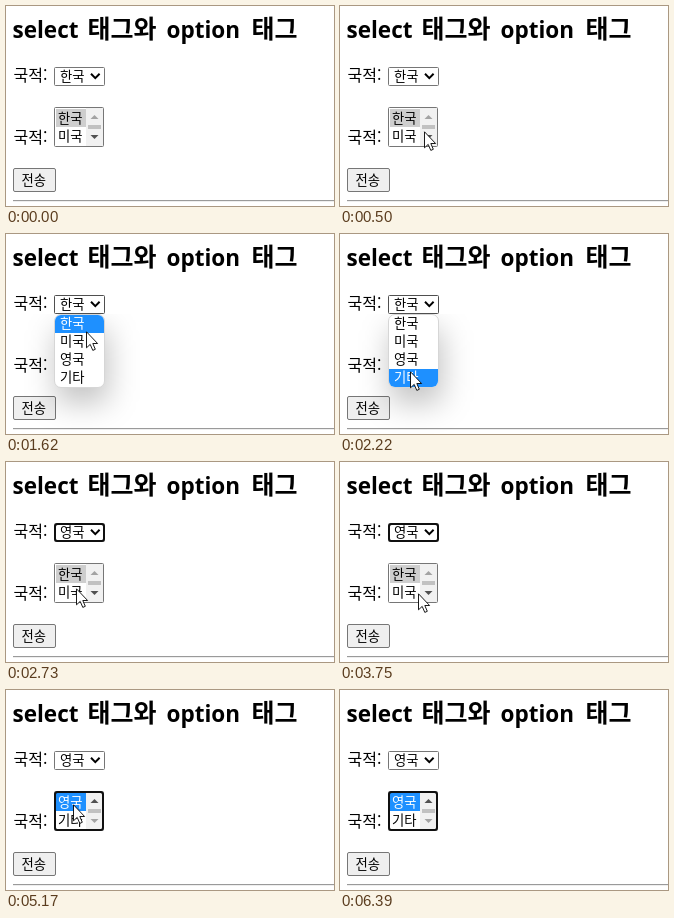
Write an HTML page that moves like this. It is 328 px wide and 200 px high and loops after 7 s.

```html
<!DOCTYPE html>
<html lang="ko">
<head>
<meta charset="utf-8">
<title>select 태그와 option 태그</title>
<style>
html, body { margin: 0; width: 100%; height: 100%; overflow: hidden; background: #fff; }
svg { display: block; width: 328px; height: 200px; }
text { font: 350 13.33px "Noto Sans CJK KR", "Noto Sans CJK", "Noto Sans CJK JP", sans-serif; fill: #000; white-space: pre; }
.h { font-size: 25px; font-weight: 700; }
.hl { font: 700 22.5px "Open Sans", "Noto Sans", sans-serif; }
.label { font-size: 16px; }
.box { fill: #fff; stroke: #767676; }
.ring { fill: none; stroke: #101010; stroke-width: 2; }

/* one loop is 7 s, so 1% is 70 ms */
.a { animation: 7s step-end infinite; }

.hover { animation-name: hover; }
@keyframes hover { 0%, 39% { stroke: #767676 } 11.42% { stroke: #4f4f4f } }

.first { animation-name: first; }
@keyframes first { 0% { visibility: visible } 39%, 100% { visibility: hidden } }
.second { animation-name: second; }
@keyframes second { 0% { visibility: hidden } 39%, 100% { visibility: visible } }
.selectRing { animation-name: selectRing; }
@keyframes selectRing { 0%, 57.85%, 100% { visibility: hidden } 39% { visibility: visible } }
.listRing { animation-name: listRing; }
@keyframes listRing { 0% { visibility: hidden } 57.85%, 100% { visibility: visible } }

.popup { animation-name: popup; }
@keyframes popup { 0%, 39%, 100% { visibility: hidden } 17.28% { visibility: visible } }
.bar { animation-name: bar; }
@keyframes bar {
  0% { transform: translateY(0) }
  24.57% { transform: translateY(18px) }
  26% { transform: translateY(36px) }
  28.85% { transform: translateY(54px) }
  33.14%, 100% { transform: translateY(36px) }
}
.o1 { animation-name: o1; }
@keyframes o1 { 0% { fill: #fff } 24.57%, 100% { fill: #000 } }
.o2 { animation-name: o2; }
@keyframes o2 { 0%, 26%, 100% { fill: #000 } 24.57% { fill: #fff } }
.o3 { animation-name: o3; }
@keyframes o3 { 0%, 28.85% { fill: #000 } 26%, 33.14%, 100% { fill: #fff } }
.o4 { animation-name: o4; }
@keyframes o4 { 0%, 33.14%, 100% { fill: #000 } 28.85% { fill: #fff } }

.rows { animation-name: rows; }
@keyframes rows {
  0% { transform: translateY(0) }
  57.85% { transform: translateY(-18px) }
  59.28%, 100% { transform: translateY(-36px) }
}
.pick { animation-name: pick; }
@keyframes pick { 0% { visibility: hidden } 73.85%, 100% { visibility: visible } }
.picked { animation-name: picked; }
@keyframes picked { 0% { fill: #000 } 73.85%, 100% { fill: #fff } }
.up { animation-name: up; }
@keyframes up { 0% { fill: #a3a3a3 } 57.85%, 100% { fill: #505050 } }
.down { animation-name: down; }
@keyframes down { 0% { fill: #505050 } 59.28%, 100% { fill: #a3a3a3 } }
.downBox { animation-name: downBox; }
@keyframes downBox { 0%, 59.28%, 100% { fill: #f1f1f1 } 55% { fill: #d2d2d2 } }

/* the pointer moves in 100 ms steps */
.pointer { animation-name: pointer; }
@keyframes pointer {
  0% { transform: translate(76px, 190px); visibility: hidden }
  2.85% { transform: translate(76px, 190px); visibility: visible; animation-timing-function: steps(3) }
  7.14% { transform: translate(84px, 125px); animation-timing-function: steps(3) }
  11.42% { transform: translate(91px, 78px) }
  12.85% { transform: translate(90px, 73px) }
  14.28% { transform: translate(90px, 72px) }
  21.71% { transform: translate(85px, 84px) }
  23.14% { transform: translate(80px, 97px); animation-timing-function: steps(4) }
  28.85% { transform: translate(72px, 142px); animation-timing-function: steps(2) }
  31.71% { transform: translate(70px, 137px) }
  33.14% { transform: translate(70px, 132px) }
  34.57% { transform: translate(70px, 128px) }
  36% { transform: translate(70px, 126px) }
  43.42% { transform: translate(75px, 122px); animation-timing-function: steps(2) }
  46.28% { transform: translate(86px, 114px) }
  49.14% { transform: translate(74px, 121px) }
  50.57% { transform: translate(60px, 129px) }
  53.57% { transform: translate(78px, 131px) }
  55% { transform: translate(94px, 133px) }
  65.14% { transform: translate(76.5px, 130px); animation-timing-function: steps(4) }
  70.85% { transform: translate(67px, 114px) }
  82.71% { transform: translate(62px, 124px) }
  84.14% { transform: translate(50px, 136px) }
  85.57% { transform: translate(43px, 150px); animation-timing-function: steps(3) }
  89.85% { transform: translate(145px, 190px); visibility: visible }
  91.28%, 100% { transform: translate(145px, 190px); visibility: hidden }
}
</style>
</head>
<body>
<svg viewBox="0 0 328 200">
  <defs>
    <clipPath id="view"><rect x="49" y="102" width="31" height="38"/></clipPath>
    <clipPath id="below"><rect y="80" width="328" height="120"/></clipPath>
    <clipPath id="menu"><rect x="49" y="81" width="49" height="72" rx="6"/></clipPath>
  </defs>

  <text class="hl" x="6.5" y="32">select</text>
  <text class="h" x="81.5" y="32">태그와</text>
  <text class="hl" x="160.5" y="32">option</text>
  <text class="h" x="245.5" y="32">태그</text>

  <text class="label" x="7.5" y="75">국적:</text>
  <rect class="box a hover" x="48.5" y="61.5" width="50" height="18" rx="1"/>
  <rect class="ring a selectRing" x="49" y="62" width="49" height="17" rx="2.5"/>
  <text class="a first" x="54" y="75">한국</text>
  <text class="a second" x="54" y="75">영국</text>
  <path d="M85 67.8l4.3 4.3 4.3-4.3" fill="none" stroke="#000" stroke-width="2"/>

  <text class="label" x="7.5" y="137">국적:</text>
  <rect class="box" x="48.5" y="101.5" width="49" height="39" rx="1"/>
  <g clip-path="url(#view)">
    <g class="a rows">
      <rect x="50" y="103" width="30" height="18" fill="#cecece"/>
      <rect class="a pick" x="50" y="139" width="30" height="18" fill="#1e90ff"/>
      <text x="52" y="117">한국</text>
      <text x="52" y="135">미국</text>
      <text class="a picked" x="52" y="153">영국</text>
      <text x="52" y="171">기타</text>
    </g>
  </g>
  <rect x="80" y="102" width="17" height="38" fill="#f1f1f1"/>
  <rect class="a downBox" x="80" y="123" width="17" height="17"/>
  <rect x="82" y="119" width="13" height="4" fill="#c1c1c1"/>
  <path class="a up" d="M84.5 113l4-4 4 4z"/>
  <path class="a down" d="M84.5 129l4 4 4-4z"/>
  <rect class="ring a listRing" x="49" y="102" width="48" height="38" rx="2.5"/>

  <rect x="7.5" y="162.5" width="42" height="23" rx="1.5" fill="#efefef" stroke="#767676"/>
  <text x="15.5" y="179">전송</text>
  <path d="M7 194.5H328" stroke="#9a9a9a"/>
  <path d="M7 195.5H328" stroke="#eee"/>

  <g class="a popup">
    <g clip-path="url(#below)">
      <rect x="50" y="95" width="52" height="74" rx="6" fill="#000" fill-opacity=".24" style="filter: blur(15px)"/>
    </g>
    <rect x="48.5" y="80.5" width="50" height="73" rx="6.5" fill="#fff" stroke="#d6d6d6"/>
    <g clip-path="url(#menu)">
      <rect class="a bar" x="49" y="81" width="49" height="18" fill="#1e90ff"/>
    </g>
    <text class="a o1" x="54" y="94">한국</text>
    <text class="a o2" x="54" y="112">미국</text>
    <text class="a o3" x="54" y="130">영국</text>
    <text class="a o4" x="54" y="148">기타</text>
  </g>

  <path class="a pointer" d="M.5.8V16.8L4.2 13.4 6.8 19.4 9.3 18.3 6.8 12.5H11.6Z" fill="#fff" stroke="#000" stroke-width=".9"/>
</svg>
</body>
</html>
```
